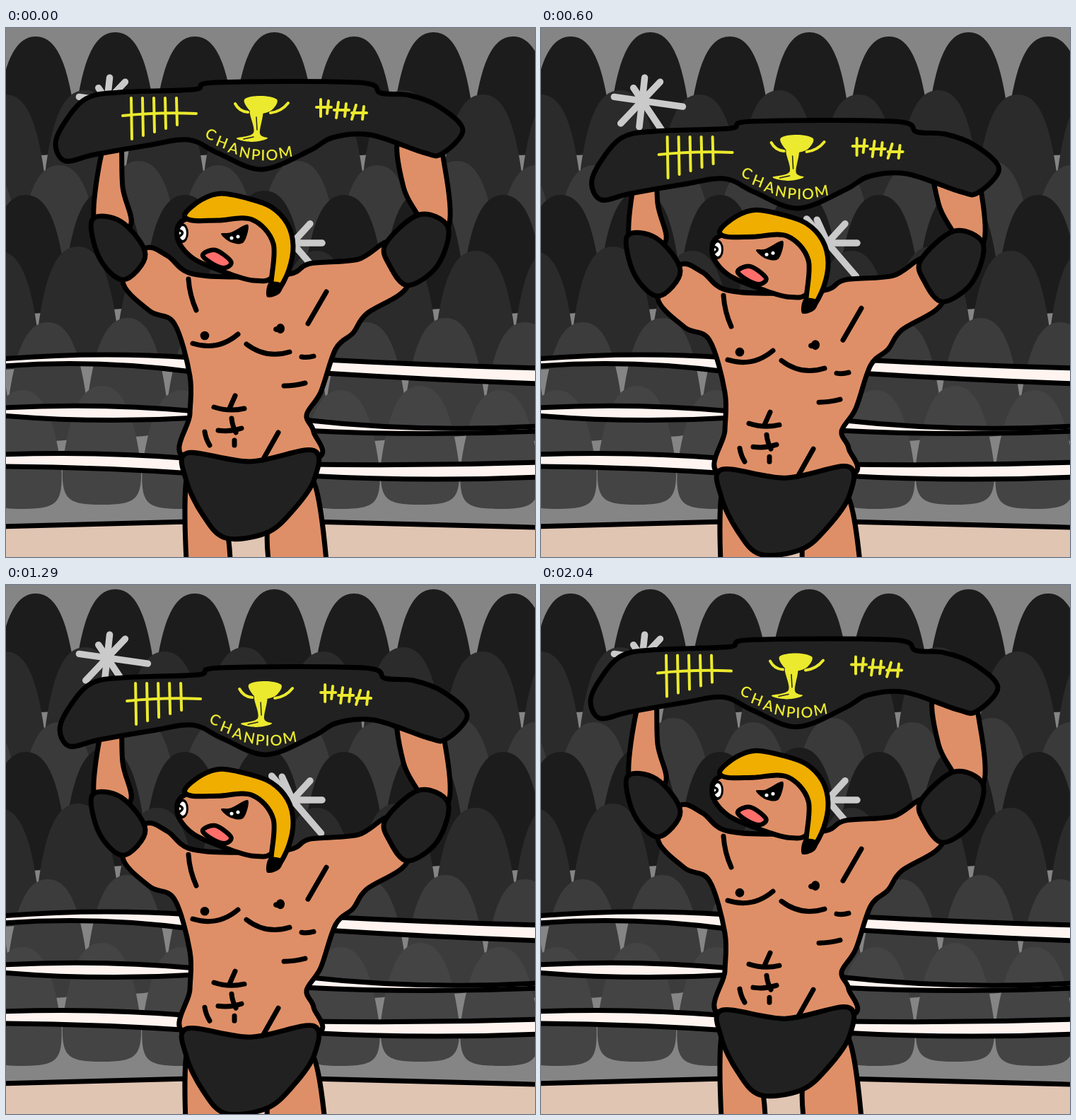
An HTML page with a canvas for the animation above (2070 ms loop, 748 px wide and 748 px high).

```html
<!DOCTYPE html>
<html lang="en">
<head>
<meta charset="utf-8">
<title>Champion</title>
<style>
  html, body { margin: 0; width: 100%; height: 100%; overflow: hidden; background: #858585; }
  canvas { display: block; }
</style>
</head>
<body>
<canvas id="stage" width="748" height="748"></canvas>
<script>
const SIZE = 748, LOOP = 2070, STEP = 30;
const INK = '#000', DARK = '#212121', SKIN = '#df8f67', GOLD = '#efae00', YELLOW = '#ebea2e', FLASH = '#cacaca';
const ctx = document.getElementById('stage').getContext('2d');
ctx.lineCap = ctx.lineJoin = 'round';

function stroke(color, width) {
  ctx.strokeStyle = color;
  ctx.lineWidth = width;
  ctx.stroke();
}

// Smooth closed shape through flat x,y points.
function blob(fill, p, width) {
  const n = p.length / 2;
  const at = i => 2 * ((i + n) % n);
  ctx.beginPath();
  ctx.moveTo(p[0], p[1]);
  for (let i = 0; i < n; i++) {
    const a = at(i - 1), b = at(i), c = at(i + 1), d = at(i + 2);
    ctx.bezierCurveTo(p[b] + (p[c] - p[a]) / 6, p[b + 1] + (p[c + 1] - p[a + 1]) / 6,
      p[c] - (p[d] - p[b]) / 6, p[c + 1] - (p[d + 1] - p[b + 1]) / 6, p[c], p[c + 1]);
  }
  ctx.closePath();
  ctx.fillStyle = fill;
  ctx.fill();
  if (width) stroke(INK, width);
}

// Stroke that sags by bow pixels, measured across its direction.
function arc(x0, y0, x1, y1, bow = 0, width = 7, color = INK) {
  const len = Math.hypot(x1 - x0, y1 - y0) || 1;
  ctx.beginPath();
  ctx.moveTo(x0, y0);
  ctx.quadraticCurveTo((x0 + x1) / 2 - 2 * bow * (y1 - y0) / len,
    (y0 + y1) / 2 + 2 * bow * (x1 - x0) / len, x1, y1);
  stroke(color, width);
}

function dot(fill, x, y, rx, ry = rx) {
  ctx.beginPath();
  ctx.ellipse(x, y, rx, ry, 0, 0, Math.PI * 2);
  ctx.fillStyle = fill;
  ctx.fill();
}

function seat(x, y, fill) {
  ctx.beginPath();
  ctx.moveTo(x, y);
  for (const s of [1, -1]) {
    ctx.moveTo(x, y);
    ctx.bezierCurveTo(x + 32 * s, y, x + 46 * s, y + 45, x + 55.5 * s, y + 112);
    ctx.bezierCurveTo(x + 57 * s, y + 160, x + 50 * s, y + 168, x, y + 168);
  }
  ctx.fillStyle = fill;
  ctx.fill();
}

// Band between two sagging edges, each given as [left y, right y, bow].
function rope(x0, x1, top, bottom) {
  const mid = e => (e[0] + e[1]) / 2 + 2 * e[2], xm = (x0 + x1) / 2;
  ctx.beginPath();
  ctx.moveTo(x0, top[0]);
  ctx.quadraticCurveTo(xm, mid(top), x1, top[1]);
  ctx.lineTo(x1, bottom[1]);
  ctx.quadraticCurveTo(xm, mid(bottom), x0, bottom[0]);
  ctx.fillStyle = '#fff4f0';
  ctx.fill();
  for (const e of [top, bottom]) arc(x0, e[0], x1, e[1], e[2]);
}

function ray(x, y, angle, from, to) {
  const c = Math.cos(angle), s = Math.sin(angle);
  arc(x + c * from, y + s * from, x + c * to, y + s * to, 0, 9.5, FLASH);
}

function drawArena() {
  ctx.fillStyle = '#858585';
  ctx.fillRect(0, 0, SIZE, SIZE);
  const rows = [
    [42, 9, '#1c1c1c'], [-1, 91, '#2b2b2b'], [75, 191, '#3a3a3a'], [28, 233, '#1c1c1c'],
    [-11, 312, '#2b2b2b'], [59, 413, '#3c3c3c'], [23, 509, '#444']
  ];
  for (const [x, y, fill] of rows)
    for (let k = -1; k < 8; k++) seat(x + k * 112.5, y + (k % 2 ? -3 : 3), fill);

  ray(143, 103, 0.14, -40, 58);
  ray(143, 103, 0.98, -22, 53);
  ray(143, 103, 1.68, -33, 37);
  ray(143, 103, 2.33, -37, 44);
  ray(405, 304, 0, 0, 42);
  ray(405, 304, 0.86, -45, 62);
  ray(405, 304, 1.15, -36, 0);
  ray(405, 304, -0.83, 0, 37);

  ctx.fillStyle = '#e0c5b3';
  ctx.fillRect(0, 702, SIZE, 46);
  arc(-5, 705, 260, 698);
  arc(430, 698, 753, 706);

  rope(-5, 262, [468, 466, -5], [478, 486, -7]);
  rope(450, 753, [469, 481, 1], [488, 503, 1]);
  rope(-5, 270, [537, 542, -5], [548, 551, 5]);
  rope(420, 753, [554, 563, 7], [569, 570, 4]);
  rope(-5, 265, [603, 609, -4], [620, 630, -2]);
  rope(425, 753, [617, 614, 2], [633, 635, 4]);
}

function drawTorso() {
  // Legs and forearms
  blob(SKIN, [257, 630, 310, 700, 312, 820, 263, 820], 7);
  blob(SKIN, [371, 700, 432, 636, 457, 800, 450, 840, 392, 840], 7);
  blob(SKIN, [146, 140, 162, 150, 165, 225, 177, 276, 150, 300, 125, 276, 129, 210], 7);
  blob(SKIN, [555, 155, 603, 140, 621, 200, 627, 276, 600, 300, 583, 266, 562, 225], 7);

  blob(SKIN, [196, 312, 228, 322, 258, 346, 317, 352, 400, 348, 430, 333, 498, 327, 545, 303, 568, 364,
    510, 404, 491, 431, 466, 454, 445, 515, 425, 547, 435, 571, 434, 610, 257, 610, 260, 546,
    260, 492, 238, 418, 203, 400, 165, 358], 7);
  blob(DARK, [122, 271, 163, 274, 197, 320, 166, 356, 132, 325], 7);
  blob(DARK, [537, 305, 584, 264, 625, 282, 610, 336, 568, 364, 542, 335], 7);
  blob(DARK, [256, 601, 345, 613, 434, 597, 436, 638, 405, 683, 368, 714, 310, 721, 278, 688, 255, 640], 7);

  // Chest
  arc(258, 355, 269, 399, 2);
  arc(453, 373, 427, 418);
  arc(264, 446, 328, 433, 9);
  arc(340, 447, 401, 458, 8);
  dot(INK, 281, 435, 6.3);
  dot(INK, 388, 425, 6, 7);
  dot(INK, 383, 426, 5, 4);

  // Ribs and belly
  arc(418, 465, 435, 464, 1);
  arc(393, 506, 423, 502, 1);
  arc(294, 536, 337, 538, 3);
  arc(324, 520, 316, 538);
  arc(300, 569, 333, 566, 2);
  arc(319, 552, 325, 572, 1);
  arc(281, 571, 288, 590, 1);
  arc(323, 583, 323, 590);
  arc(385, 572, 363, 611);
}

function drawHead(blink, shut) {
  blob(SKIN, [258, 269, 242, 295, 265, 326, 317, 348, 350, 357, 376, 352, 381, 310, 345, 268], 7);
  if (blink) {
    arc(246, 295, 265, 295, 0, 5);
  } else {
    dot(INK, 249, 290, 9, 14);
    dot('#fff', 250, 290, 5, 10);
    arc(245, 286, 246, 294, -4, 3.5);
  }

  blob(GOLD, [253, 263, 276, 243, 304, 234, 342, 241, 375, 253, 398, 277, 406, 308, 400, 342, 385, 370,
    375, 364, 378, 305, 348, 271, 300, 272, 263, 272], 7);
  arc(351, 271, 379, 306, -4, 4);
  blob(INK, [372, 360, 391, 362, 386, 376, 369, 380]);

  blob(INK, [304, 291, 318, 289, 342, 278, 336, 303, 318, 303]);
  dot('#fff', 319, 297, 2.5);
  dot('#fff', 328, 295, 2.5);

  if (shut) arc(284, 325, 319, 323, -1, 6);
  else blob('#ff6e6b', [278, 321, 296, 314, 318, 330, 310, 339, 293, 334], 6.5);
}

// Letters set along a parabola, turned partly towards its slope.
function drawLettering(text) {
  const bend = 0.005, low = 366;
  ctx.font = '600 21px Lato, Inter, sans-serif';
  ctx.textAlign = 'center';
  ctx.textBaseline = 'middle';
  ctx.fillStyle = YELLOW;
  let x = 282;
  for (const ch of text) {
    const w = ctx.measureText(ch).width, d = x + w / 2 - low;
    ctx.save();
    ctx.translate(low + d, 181 - bend * d * d);
    ctx.rotate(-bend * d * 1.2);
    ctx.fillText(ch, 0, 0);
    ctx.restore();
    x += w + 1;
  }
}

function drawBelt() {
  blob(DARK, [70, 165, 82, 135, 113, 100, 160, 91, 265, 87, 297, 77, 498, 77, 530, 92, 570, 95, 612, 111,
    646, 144, 616, 178, 590, 176, 515, 151, 462, 155, 430, 173, 362, 200, 300, 177, 258, 158, 200, 166,
    125, 179, 84, 188], 7);

  const mark = (...p) => arc(...p, 4, YELLOW);
  for (let i = 0; i < 5; i++) mark(177 + 16 * i, 99, 178 + 16 * i, 157 - 5 * i, 0);
  mark(165, 124, 269, 121, -2);
  for (let k = 0; k < 3; k++) {
    const x = 445 + 25 * k, y = 101 + 4 * k;
    mark(x, y, x - 3 * k, y + 24 - 2 * k, 0);
    mark(x + 11, y + 2, x + 9, y + 20, 0);
    mark(x - 6, y + 11, x + 15, y + 11, 0);
  }

  // Cup
  blob(YELLOW, [337, 101, 360, 96, 383, 101, 377, 115, 362, 121, 346, 118]);
  blob(YELLOW, [345, 117, 363, 117, 359, 149, 370, 156, 348, 161, 326, 156, 350, 148]);
  mark(324, 107, 342, 119, 3);
  mark(399, 106, 374, 120, -3);
  arc(354, 126, 355, 144, 0, 1.5, DARK);
  arc(336, 157, 350, 154, 0, 1.5, DARK);

  drawLettering('CHANPIOM');
}

// Cosine easing between the turning points [ms, value].
const bodyTurns = [[0, 0], [440, 28.5], [870, 11], [1420, 28.5], [LOOP, 0]];
const beltTurns = [[0, 0], [420, 65], [960, 25], [1620, 55], [LOOP, 0]];

function swing(turns, t) {
  const i = turns.findIndex(k => k[0] > t);
  const [t0, v0] = turns[i - 1], [t1, v1] = turns[i];
  return v0 + (v1 - v0) * (1 - Math.cos(Math.PI * (t - t0) / (t1 - t0))) / 2;
}

// Belt drifts right, then back.
function drift(t) {
  const u = t < 1080 ? (t - 510) / 570 : (2040 - t) / 960;
  return 6.5 * Math.sin(Math.PI / 2 * Math.max(0, u));
}

function shifted(x, y, draw) {
  ctx.save();
  ctx.translate(x, y);
  draw();
  ctx.restore();
}

function frame() {
  const t = Math.floor((performance.now() % LOOP) / STEP) * STEP;
  const blink = t >= 1020 && t < 1140;
  const shut = t >= 1410 && t < 1590;
  drawArena();
  shifted(0, swing(bodyTurns, t), () => {
    drawTorso();
    drawHead(blink, shut);
  });
  shifted(drift(t), swing(beltTurns, t), drawBelt);
  requestAnimationFrame(frame);
}
frame();
</script>
</body>
</html>
```
